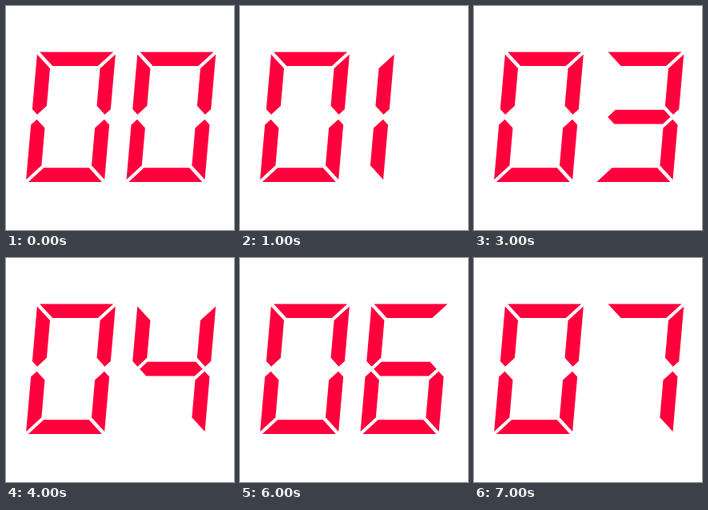
An HTML page with a canvas for the animation above (8 s loop, 285x280 px).

```html
<!DOCTYPE html>
<html>
<head>
<meta charset="utf-8">
<style>
  html, body { margin: 0; width: 100%; height: 100%; overflow: hidden; background: #fff; }
  canvas { display: block; }
</style>
</head>
<body>
<canvas id="stage" width="285" height="280"></canvas>
<script>
const ctx = document.getElementById('stage').getContext('2d');

// Half width, half height, stroke thickness, joint gap, side joint and slant of a digit.
const W = 49, H = 81.3, T = 17.7, GAP = 3, JOINT = 42.2, SLANT = 0.0875;
const CENTER_X = 81, CENTER_Y = 138.7, DIGIT_PITCH = 125.4, ONE_SHIFT = -69.5;

function polygon(...points) {
  ctx.beginPath();
  for (const [x, y] of points) ctx.lineTo(x, y);
  ctx.fill();
}

function mirrored(sx, sy, shape) {
  ctx.save();
  ctx.scale(sx, sy);
  shape();
  ctx.restore();
}

// Cut at 45 degrees at both ends; drawn for the lower right quarter.
function upright() {
  const inner = W - T, end = H - GAP;
  polygon([JOINT, GAP], [W, GAP + W - JOINT], [W, end],
          [inner, end - T], [inner, GAP + JOINT - inner]);
}

function bar() {
  const outer = W - GAP, inner = outer - T;
  polygon([-outer, H], [outer, H], [inner, H - T], [-inner, H - T]);
}

function middle() {
  const tip = JOINT - GAP, half = T / 2, edge = tip - half;
  polygon([-tip, 0], [-edge, -half], [edge, -half],
          [tip, 0], [edge, half], [-edge, half]);
}

const segments = {
  a: () => mirrored(1, -1, bar),
  b: () => mirrored(1, -1, upright),
  c: upright,
  d: bar,
  e: () => mirrored(-1, 1, upright),
  f: () => mirrored(-1, -1, upright),
  g: middle
};
const lit = ['abcdef', 'bc', 'abdeg', 'abcdg', 'bcfg', 'acdfg', 'acdefg', 'abc'];

function drawDigit(value, x) {
  // A one sits nearer the left of its cell.
  const shift = value === 1 ? ONE_SHIFT : 0;
  ctx.save();
  ctx.transform(1, 0, -SLANT, 1, x + shift, CENTER_Y);
  for (const name of lit[value]) segments[name]();
  ctx.restore();
}

function draw(ms) {
  ctx.fillStyle = '#fff';
  ctx.fillRect(0, 0, 285, 280);
  ctx.fillStyle = '#ff003c';
  drawDigit(0, CENTER_X);
  drawDigit(Math.floor(ms / 1000) % lit.length, CENTER_X + DIGIT_PITCH);
}

const start = performance.now();
function tick() {
  draw(performance.now() - start);
  requestAnimationFrame(tick);
}
tick();
</script>
</body>
</html>
```
